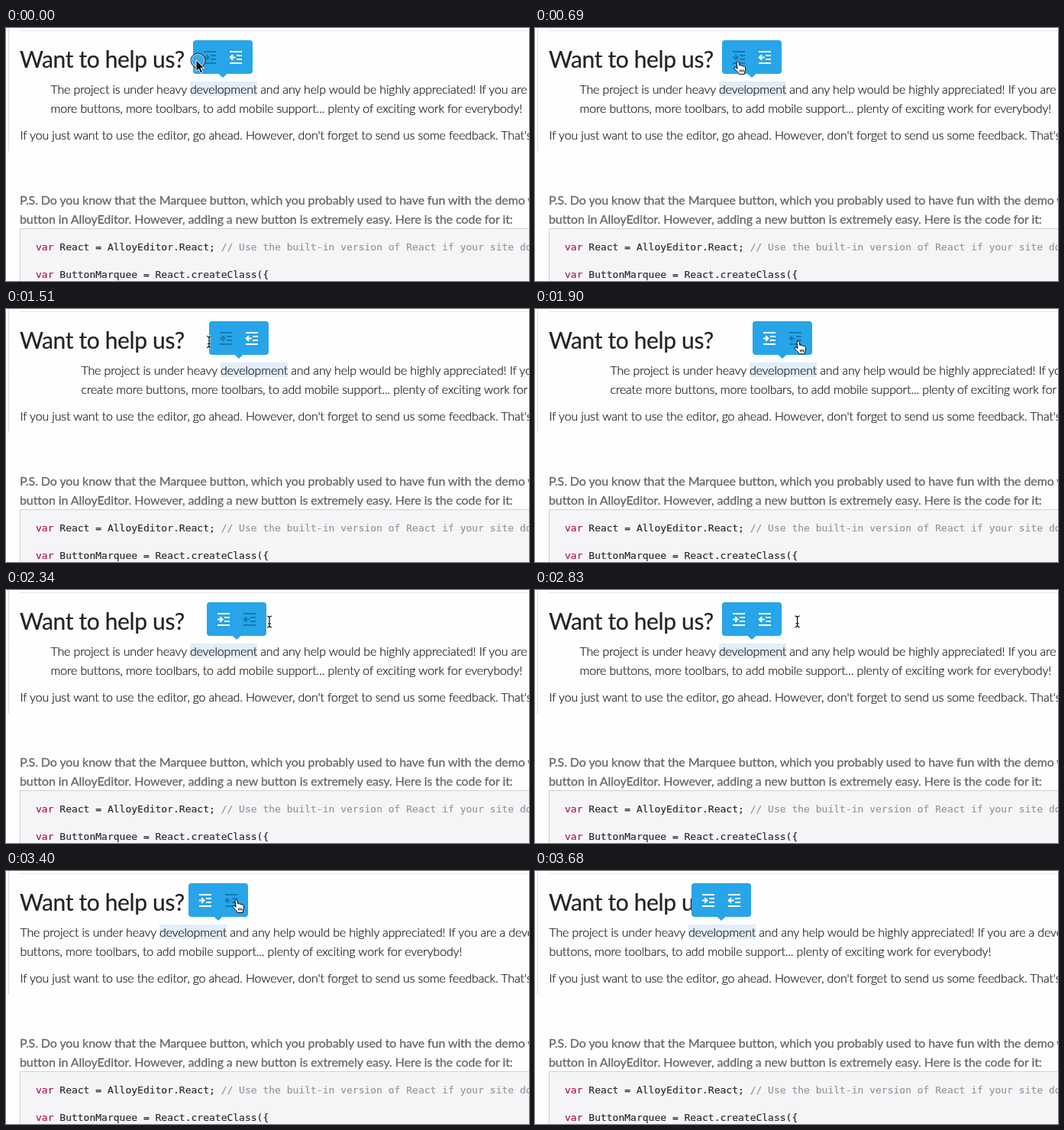
An HTML page that plays this animation: 685x331 px, repeating every 4480 ms.

```html
<!DOCTYPE html>
<html lang="en">
<head>
<meta charset="utf-8">
<title>Indent and outdent toolbar</title>
<style>
html, body { margin: 0; width: 100%; height: 100%; overflow: hidden; background: #fefefe; }
#stage { position: relative; width: 685px; height: 331px; overflow: hidden; }
#stage > * { position: absolute; }
.text { white-space: pre; font: 300 16px/25px Lato, sans-serif; letter-spacing: -.01em; color: #141416; left: 18.5px; -webkit-text-stroke: .2px #141416; }
h2.text { margin: 0; left: 18px; top: 22px; font-size: 30px; line-height: 36px; letter-spacing: -.012em; font-weight: 400; color: #222326; }
mark { background: #e2eefa; color: inherit; }
.note { left: 18px; top: 212px; font-weight: 400; letter-spacing: -.006em; color: #676769; -webkit-text-stroke: .3px #676769; }
.rule { left: 18px; top: 3px; width: 667px; height: 1px; background: #e6e6e8; }
.edge { left: 3px; top: 0; height: 161px; border-left: 1px dotted #b9b9b9; }
.code { left: 18px; top: 262px; width: 700px; height: 90px; border: 1px solid #cfd0d3; background: #f5f5f7; box-sizing: border-box; }
pre { margin: 0; left: 39px; top: 278px; font: 13px/18px "DejaVu Sans Mono", monospace; color: #28282b; -webkit-text-stroke: .15px; }
pre b { font-weight: 400; color: #ab1058; }
pre i { font-style: normal; color: #949498; }
svg { left: 0; top: 0; }
.icon { fill: none; stroke: #fff; stroke-width: 2; }
.icon.dim { stroke: #1679b3; }
</style>
</head>
<body>
<div id="stage">
  <div class="rule"></div>
  <div class="edge"></div>
  <h2 class="text">Want to help us?</h2>
  <div class="text" id="para" style="top:67px">The project is under heavy <mark>development</mark> and any help would be highly appreciated! If you are a developer, feel free to
<span id="wrap"></span>more toolbars, to add mobile support... plenty of exciting work for everybody!</div>
  <div class="text" style="top:127px">If you just want to use the editor, go ahead. However, don't forget to send us some feedback. That's extremely</div>
  <div class="text note">P.S. Do you know that the Marquee button, which you probably used to have fun with the demo was not a
button in AlloyEditor. However, adding a new button is extremely easy. Here is the code for it:</div>
  <div class="code"></div>
  <pre><b>var</b> React = AlloyEditor.React; <i>// Use the built-in version of React if your site does not</i>

<b>var</b> ButtonMarquee = React.createClass({</pre>
  <svg width="685" height="331" viewBox="0 0 685 331">
    <g id="bar">
      <path d="M33 43.5h12l-6 5.5z" fill="#27a5e8"/>
      <rect width="78" height="44" rx="4" fill="#27a5e8"/>
      <g class="icon" transform="translate(14 14)">
        <path d="M0 1H16M9 6H16M9 11H16M0 16H16M0 8.5H6M3.2 5.3L6.5 8.5L3.2 11.7"/>
      </g>
      <g class="icon" transform="translate(48 14)">
        <path d="M0 1H16M9 6H16M9 11H16M0 16H16M1 8.5H7.5M4 5.3L.8 8.5L4 11.7"/>
      </g>
    </g>
    <g id="ring">
      <circle cx="251.5" cy="42.5" r="9.5" fill="#39ace9" stroke="#111"/>
      <circle cx="251.5" cy="42.5" r="8.5" fill="none" stroke="#fff" stroke-opacity=".6"/>
    </g>
    <g id="cursor">
      <path id="arrow" d="M0 0V14.5L3.4 11.4L5.8 17L8.4 15.9L6 10.4H10.6Z" fill="#000" stroke="#fff"/>
      <path id="hand" transform="translate(-6 0)" fill="#fff" stroke="#000" stroke-linejoin="round"
        d="M4 2C4 .2 6.6 .2 7 2L8 6.2C8.6 5.1 10.3 5.3 10.6 6.7C11.4 5.8 12.8 6.2 13.1 7.4C14.1 6.8 15.5 7.4 15.6 8.8C15.9 12 14.6 13.4 14.3 15.2V17.4H7.1C6.6 15.2 3.8 13.3 1.4 10.4C.4 9 1.8 7.8 3.1 8.7L5.1 10.2ZM8.6 11.5V14.5M10.6 11.5V14.5M12.6 11.5V14.5"/>
      <g id="beam" fill="none">
        <path d="M-3 -7.5Q0 -7 0 -5Q0 -7 3 -7.5M0 -5V5M-3 7.5Q0 7 0 5Q0 7 3 7.5M-2 2.5H2" stroke="#fff" stroke-width="3" stroke-opacity=".75"/>
        <path d="M-3 -7.5Q0 -7 0 -5Q0 -7 3 -7.5M0 -5V5M-3 7.5Q0 7 0 5Q0 7 3 7.5M-2 2.5H2" stroke="#111" stroke-width="1.2"/>
      </g>
    </g>
  </svg>
</div>
<script>
const LOOP = 4480;
const $ = id => document.getElementById(id);
const icons = document.querySelectorAll('.icon');

// [time, left margin, start of the second line]
const indents = [
  [0, 58.5, 'more buttons, '],
  [1350, 98.5, 'create more buttons, '],
  [2110, 58.5, 'more buttons, '],
  [3310, 18.5, 'buttons, ']
];
// [start, end, x, y]: each row is reached by its end
const barMoves = [[0, 0, 245, 16], [1385, 1625, 285, 16], [2220, 2450, 245, 16], [3345, 3585, 205, 16]];
const mouseMoves = [
  [0, 0, 249, 42], [500, 680, 266, 43], [1630, 1870, 345, 41.5],
  [2780, 3250, 302, 37], [3440, 3680, 704, 268]
];
// [time, index of the darkened icon]
const hovers = [[0, 0], [1660, -1], [1780, 1], [2790, -1], [3010, 1], [3450, -1]];

const latest = (rows, t) => rows.filter(r => r[0] <= t).pop();
const ease = p => p * p * (3 - 2 * p);

function place(moves, t) {
  let [, , x, y] = moves[0];
  for (const [from, to, nx, ny] of moves.slice(1)) {
    if (t < from) break;
    const p = ease(Math.min(1, (t - from) / (to - from)));
    x += (nx - x) * p;
    y += (ny - y) * p;
  }
  return [x, y];
}

const moveTo = (el, [x, y]) => el.setAttribute('transform', `translate(${x} ${y})`);
const show = (el, on) => { el.style.display = on ? '' : 'none'; };

function pointer(t, [mx, my], [bx, by]) {
  if (t < 650) return 'arrow';
  const over = mx > bx + 1 && mx < bx + 78 && my > by && my < by + 44;
  if (!over) return 'beam';
  return t > 1630 && t < 1900 ? 'arrow' : 'hand';
}

function draw(t) {
  const [, margin, start] = latest(indents, t);
  $('para').style.left = margin + 'px';
  if ($('wrap').textContent !== start) $('wrap').textContent = start;

  // the toolbar sits on whole pixels
  const bar = place(barMoves, t).map(Math.round), mouse = place(mouseMoves, t);
  moveTo($('bar'), bar);
  moveTo($('cursor'), mouse);

  const kind = pointer(t, mouse, bar);
  for (const id of ['arrow', 'hand', 'beam']) show($(id), id === kind);
  show($('ring'), t < 20);

  const dim = latest(hovers, t)[1];
  icons.forEach((icon, i) => icon.classList.toggle('dim', i === dim));
}

const begin = performance.now();
function tick() {
  draw((performance.now() - begin) % LOOP);
  requestAnimationFrame(tick);
}
draw(0);
requestAnimationFrame(tick);
</script>
</body>
</html>
```
